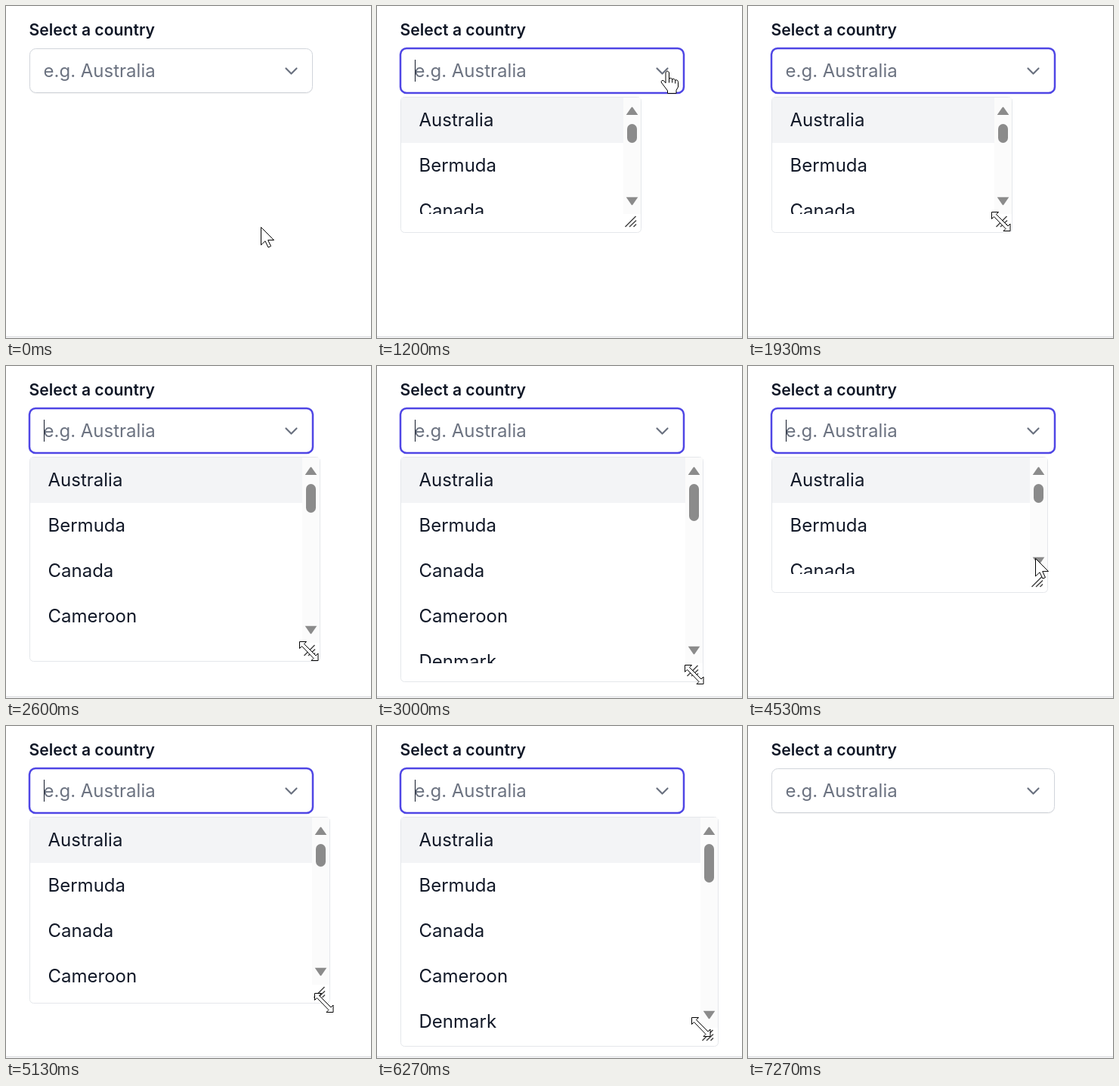
These frames come from a looping animation (483 px wide and 439 px high, 7600 ms). An HTML page:

```html
<!DOCTYPE html>
<html lang="en">
<head>
<meta charset="utf-8">
<title>Country select</title>
<style>
  html, body { margin: 0; width: 100%; height: 100%; overflow: hidden; background: #fff; }
  svg { display: block; font-family: Inter, "Liberation Sans", sans-serif; }
  text { white-space: pre; }
  .item { font-size: 24px; fill: #111827; }
  .cursor path { fill: #fff; stroke: #000; stroke-width: 1; stroke-linejoin: round; }
  .cursor .line { fill: none; }
</style>
</head>
<body>
<svg width="483" height="439" viewBox="0 0 483 439">
  <defs>
    <clipPath id="clip"><rect id="view" x="31" y="121" width="319" height="154"/></clipPath>
  </defs>
  <rect x="0" y="437" width="483" height="1" fill="#d4d6da"/>
  <text x="30.5" y="39" font-size="21.15" font-weight="600" fill="#111827">Select a country</text>

  <rect x="31.5" y="57.5" width="374" height="58" rx="8" fill="none" stroke="#000" stroke-opacity=".06"/>
  <rect id="field" x="31.5" y="56.5" width="374" height="58" rx="8" fill="#fff" stroke="#d1d5db"/>
  <rect id="ring" x="31" y="56" width="375" height="59" rx="8" fill="none" stroke="#4f46e5" stroke-width="2.5"/>
  <text x="49.5" y="94" font-size="24" fill="#6b7280">e.g. Australia</text>
  <path d="M370.5 82.5l7 7 7-7" fill="none" stroke="#6b7280" stroke-width="2.2" stroke-linecap="round" stroke-linejoin="round"/>
  <rect id="caret" x="50" y="71" width="1" height="29" fill="#111827"/>

  <g id="panel">
    <rect id="box" x="31.5" y="120.5" rx="5" fill="#fff" stroke="#e5e7eb"/>
    <g clip-path="url(#clip)">
      <rect id="active" x="32" y="121" height="60" fill="#f3f4f6"/>
      <g id="items"></g>
      <g id="bar">
        <rect x="-24" y="121" width="23" height="320" fill="#fbfbfb"/>
        <path d="M-20.3 144l6.9-10q.9-1.1 1.8 0l6.9 10z" fill="#8b8b8b"/>
        <path id="down" d="M-20.3-5.3l6.9 10q.9 1.1 1.8 0l6.9-10z" fill="#8b8b8b"/>
        <rect id="thumb" x="-19" y="156" width="13" rx="6.5" fill="#8b8b8b"/>
      </g>
    </g>
    <path id="grip" d="M-21.5-8l14-14M-16-8l9-8.5M-10.5-8l3.5-3.5" fill="none" stroke="#444" stroke-width="1.5"/>
  </g>

  <g id="arrow" class="cursor">
    <path d="M.5.5V24L6 18.8l4 8.4 3.5-1.6-3.8-8H17.5z"/>
  </g>
  <g id="hand" class="cursor">
    <path d="M-1 2Q1.2-2 3.5 2V10Q6 8 7.7 10.8 10 9.3 11.7 12 15 11 15.5 14.5V21L13 25.5V29.5H1.5V26L-3 20-6.8 15Q-7 11.5-3.7 12.7L-1 15.8z"/>
    <path class="line" d="M3.5 9.5v6M7.7 10.5v5M11.7 12v4.5"/>
  </g>
  <g id="resize" class="cursor">
    <path d="M-12.5-12.5h9l-3 3 15.5 15.5 3-3v9.5H3l3-3L-9.5-6.5l-3 3z"/>
  </g>
</svg>
<script>
const LOOP = 7600, TICK = 200 / 3, ROW = 60;
const OPEN = 16, CLOSE = 108;
const $ = id => document.getElementById(id);

// Key points of the pointer path: tick, x, y
const PATH = [
  [0, 337, 292], [4, 313, 252], [12, 377, 83], [16, 383, 86], [18, 383, 86],
  [24, 354, 253], [29, 335, 285], [31, 335, 285], [38, 400.5, 375.5],
  [39, 401, 377], [47, 424, 413], [50, 425, 411], [54, 415.4, 330],
  [63, 382, 252], [68, 380, 254], [72, 382, 285], [77, 421, 366],
  [82, 437, 409], [93, 437, 409], [94, 429, 398], [95, 434, 415]
];

// Pointer shape from each tick on
const SHAPES = [[0, "arrow"], [11, "hand"], [20, "arrow"], [27, "resize"],
  [66, "arrow"], [71, "resize"], [96, ""]];

const clamp = (v, lo, hi) => Math.min(Math.max(v, lo), hi);

function slope(i, axis) {
  const a = PATH[i], b = PATH[i + 1];
  return a && b ? (b[axis] - a[axis]) / (b[0] - a[0]) : 0;
}

// Harmonic mean of the neighbouring slopes: smooth without overshoot
function tangent(i, axis) {
  const p = slope(i - 1, axis), q = slope(i, axis);
  return p * q > 0 ? 2 * p * q / (p + q) : 0;
}

function pointer(tick) {
  const k = clamp(tick, 0, PATH[PATH.length - 1][0]);
  const i = Math.max(0, PATH.findIndex(p => p[0] >= k) - 1);
  const a = PATH[i], b = PATH[i + 1], span = b[0] - a[0];
  const u = (k - a[0]) / span, v = 1 - u;
  return [1, 2].map(axis =>
    v * v * (1 + 2 * u) * a[axis] + u * u * (1 + 2 * v) * b[axis] +
    span * u * v * (v * tangent(i, axis) - u * tangent(i + 1, axis)));
}

// The corner trails the pointer by one tick in two drags and rests otherwise
function corner(k) {
  const s = k - 1;
  const held = s < 72 ? clamp(s, 31, 63) : Math.min(s, 82);
  const [x, y] = pointer(held);
  return [Math.round(x + 15), Math.max(300, Math.round(y + 15))];
}

// Blinks every 8 ticks, but stays lit while dragging
function caretOn(k) {
  const age = k < 32 ? k - OPEN : Math.max(0, k - 88);
  return (age >> 3) % 2 === 0;
}

const show = (id, on) => { $(id).style.display = on ? "" : "none"; };
const set = (id, attrs) => {
  for (const a in attrs) $(id).setAttribute(a, attrs[a]);
};
const move = (id, x, y) => set(id, { transform: `translate(${x} ${y})` });

function drawPanel(k) {
  const [r, b] = corner(k);
  const h = b - 25 - 121;
  set("box", { width: r - 32, height: b - 121 });
  set("view", { width: r - 32, height: h });
  set("active", { width: r - 56 });
  set("thumb", { height: Math.max(25, Math.round((h - 70) * h / 1130)) });
  move("bar", r, 0);
  move("down", 0, b - 42);
  move("grip", r, b);
}

function draw(ms) {
  const k = Math.floor((ms + 4) / TICK);
  const open = k >= OPEN && k < CLOSE;
  show("ring", k >= OPEN && k <= CLOSE);
  show("panel", open);
  show("caret", open && caretOn(k));
  if (open) drawPanel(k);

  const shape = SHAPES.filter(s => s[0] <= k).pop()[1];
  for (const id of ["arrow", "hand", "resize"]) show(id, id === shape);
  if (shape) move(shape, ...pointer(k).map(Math.round));
}

["Australia", "Bermuda", "Canada", "Cameroon", "Denmark"].forEach((name, i) => {
  const t = document.createElementNS("http://www.w3.org/2000/svg", "text");
  t.setAttribute("class", "item");
  t.setAttribute("x", 55.5);
  t.setAttribute("y", 159 + ROW * i);
  t.textContent = name;
  $("items").append(t);
});

const start = performance.now();
function loop() {
  draw((performance.now() - start) % LOOP);
  requestAnimationFrame(loop);
}
loop();
</script>
</body>
</html>
```
